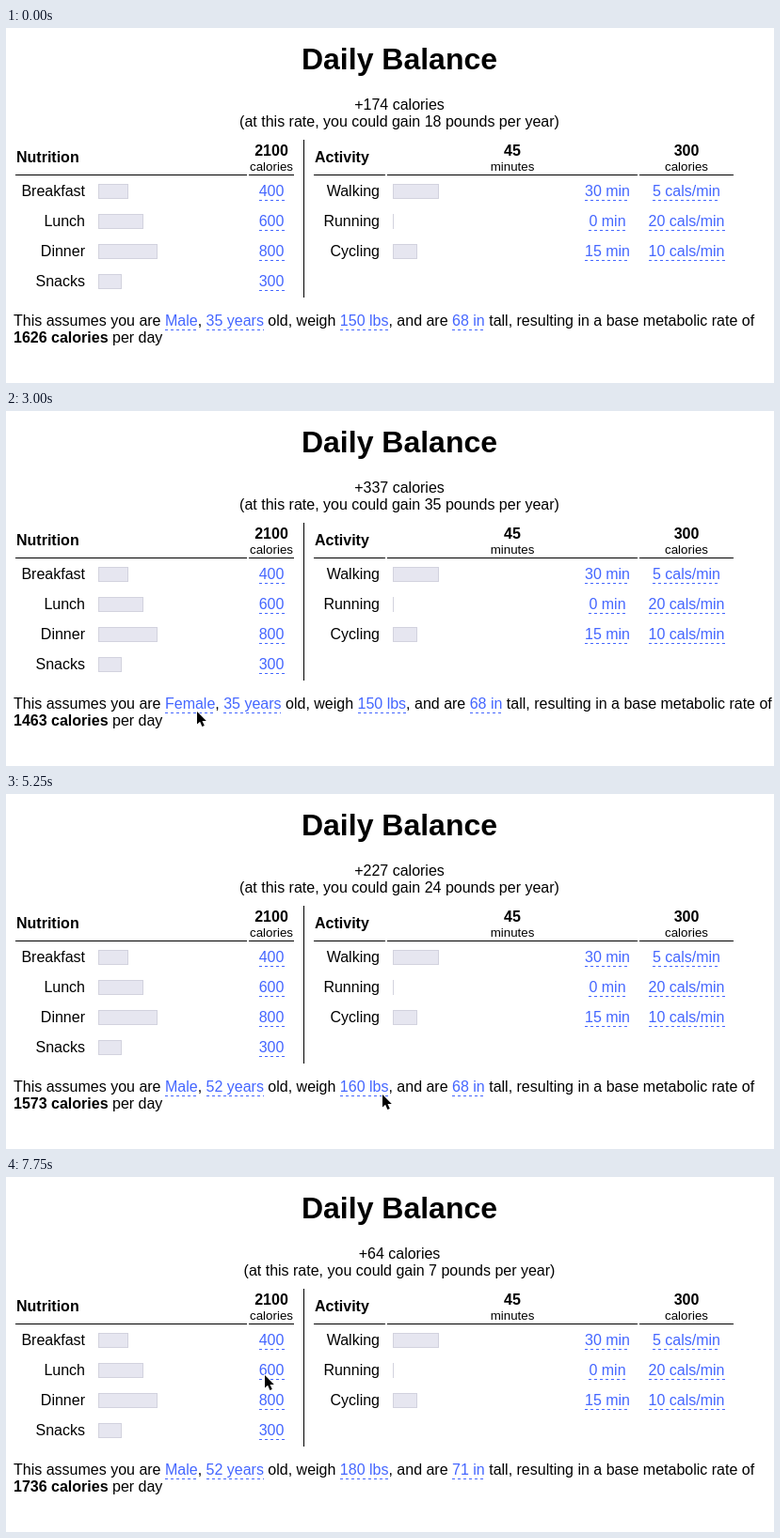
Animation, 816 px wide and 378 px high, one loop 8 s. Source, as an HTML page:

```html
<!DOCTYPE html>
<html lang="en">
<head>
<meta charset="utf-8">
<title>Daily Balance</title>
<style>
  html, body { margin: 0; width: 100%; height: 100%; overflow: hidden; background: #fff; }
  svg { display: block; width: 816px; height: 378px; }
  text { font: 16px "Liberation Sans", Arial, sans-serif; white-space: pre; }
  .title { font-size: 32px; }
  .title, .bold { font-weight: bold; }
  .small { font-size: 13.333px; }
  .link { fill: #46f; }
  .under { stroke: #46f; stroke-dasharray: 3 3; shape-rendering: crispEdges; }
  .bar { fill: #e6e6f0; stroke: #d2d2de; }
</style>
</head>
<body>
<svg id="stage" viewBox="0 0 816 378"></svg>
<script>
const LOOP = 8000, STEP = 250;
const svg = document.getElementById('stage');

function add(tag, attrs, parent = svg) {
  const el = document.createElementNS('http://www.w3.org/2000/svg', tag);
  for (const k in attrs) el.setAttribute(k, attrs[k]);
  parent.appendChild(el);
  return el;
}

function label(str, x, y, anchor = 'start', cls = '') {
  const el = add('text', { x, y, 'text-anchor': anchor, class: cls });
  el.textContent = str;
  return el;
}

function underline(x, width, base, parent = svg) {
  const x1 = Math.round(x), y = base + 4.5;
  add('line', { x1, x2: x1 + Math.round(width), y1: y, y2: y, class: 'under' }, parent);
}

function link(str, cx, base) {
  const w = label(str, cx, base, 'middle', 'link').getComputedTextLength();
  underline(cx - w / 2, w, base);
}

function heading(num, unit, cx) {
  label(num, cx, 136, 'middle', 'bold');
  label(unit, cx, 152, 'middle', 'small');
}

function row(i, name, right, barX, barW, links) {
  const base = 179 + i * 32;
  label(name, right, base, 'end');
  if (barW > 2) add('rect', { x: barX + .5, y: base - 12.5, width: barW - 1, height: 15, class: 'bar' });
  else add('rect', { x: barX, y: base - 13, width: 1, height: 16, fill: '#d2d2de' });
  for (const [str, cx] of links) link(str, cx, base);
}

const rule = (x, y, width, height) => add('rect', { x, y, width, height });

label('Daily Balance', 418, 44, 'middle', 'title');
const netText = label('', 418, 87, 'middle');
const rateText = label('', 418, 105, 'middle');

label('Nutrition', 11, 143, 'start', 'bold');
heading('2100', 'calories', 282);
label('Activity', 328, 143, 'start', 'bold');
heading('45', 'minutes', 538);
heading('300', 'calories', 723);
for (const [x, w] of [[10, 246], [258, 48], [327, 76], [405, 266], [673, 100]]) rule(x, 156, w, 1);
rule(316, 119, 1, 168);

[['Breakfast', 400, 32], ['Lunch', 600, 48], ['Dinner', 800, 63], ['Snacks', 300, 25]]
  .forEach(([name, cals, w], i) => row(i, name, 84, 98, w, [[cals, 282]]));
[['Walking', 30, 5, 49], ['Running', 0, 20, 1], ['Cycling', 15, 10, 26]]
  .forEach(([name, min, rate, w], i) =>
    row(i, name, 397, 411, w, [[min + ' min', 639], [rate + ' cals/min', 723]]));

const lines = add('g', {});
const sentence = label('', 8, 317);
const result = label('', 8, 335);
const cursor = add('path', {
  d: 'M0 0V13.6L3.1 10.8L5.4 16L7.8 15L5.5 9.9H9.8Z',
  stroke: '#fff', 'stroke-width': 1.6, 'paint-order': 'stroke'
});

// Keys: [step, value, ...]
const path = [
  [1, 475, 90], [5, 112, 155], [8, 184, 331], [9, 189, 321], [10, 197, 320], [11, 203, 320],
  [12, 203, 320], [13, 196, 322], [14, 243, 324], [15, 243, 324], [16, 257, 324], [19, 303, 325],
  [20, 384, 322], [21, 400, 320], [23, 431, 320], [24, 490, 320], [26, 512, 316],
  [27, 505, 312], [29, 400, 272], [30, 319, 240], [31, 275, 211]
];
const ages = [[15, 35], [16, 39], [19, 52]];
const weights = [[20, 150], [21, 160], [23, 180]];
const heights = [[24, 68], [26, 71]];

function at(keys, step, col = 1) {
  const i = keys.findIndex(k => k[0] >= step);
  if (i < 0) return keys[keys.length - 1][col];
  if (i === 0) return keys[0][col];
  const a = keys[i - 1], b = keys[i];
  return Math.round(a[col] + (b[col] - a[col]) * (step - a[0]) / (b[0] - a[0]));
}

function fill(el, parts) {
  el.textContent = '';
  return parts.map(([str, cls]) => {
    const span = add('tspan', cls ? { class: cls } : {}, el);
    span.textContent = str;
    return span;
  });
}

function draw(step) {
  const female = step >= 10 && step <= 12;
  const age = at(ages, step), lbs = at(weights, step), inches = at(heights, step);
  const rate = Math.round(female
    ? 655 + 4.35 * lbs + 4.7 * inches - 4.7 * age
    : 66 + 6.23 * lbs + 12.7 * inches - 6.8 * age);
  const net = 2100 - 300 - rate;

  netText.textContent = `+${net} calories`;
  rateText.textContent = `(at this rate, you could gain ${Math.round(net * 365 / 3500)} pounds per year)`;

  lines.textContent = '';
  let x = 8;
  const spans = fill(sentence, [
    ['This assumes you are '], [female ? 'Female' : 'Male', 'link'],
    [', '], [age + ' years', 'link'],
    [' old, weigh '], [lbs + ' lbs', 'link'],
    [', and are '], [inches + ' in', 'link'],
    [' tall, resulting in a base metabolic rate of']
  ]);
  spans.forEach((span, i) => {
    const w = span.getComputedTextLength();
    if (i % 2) underline(x, w, 317, lines);
    x += w;
  });
  fill(result, [[rate + ' calories', 'bold'], [' per day']]);

  cursor.setAttribute('visibility', step ? 'visible' : 'hidden');
  cursor.setAttribute('transform', `translate(${at(path, step)} ${at(path, step, 2)})`);
}

let shown = -1;
function tick() {
  const step = Math.floor(performance.now() % LOOP / STEP);
  if (step !== shown) draw(shown = step);
  requestAnimationFrame(tick);
}
tick();
</script>
</body>
</html>
```
